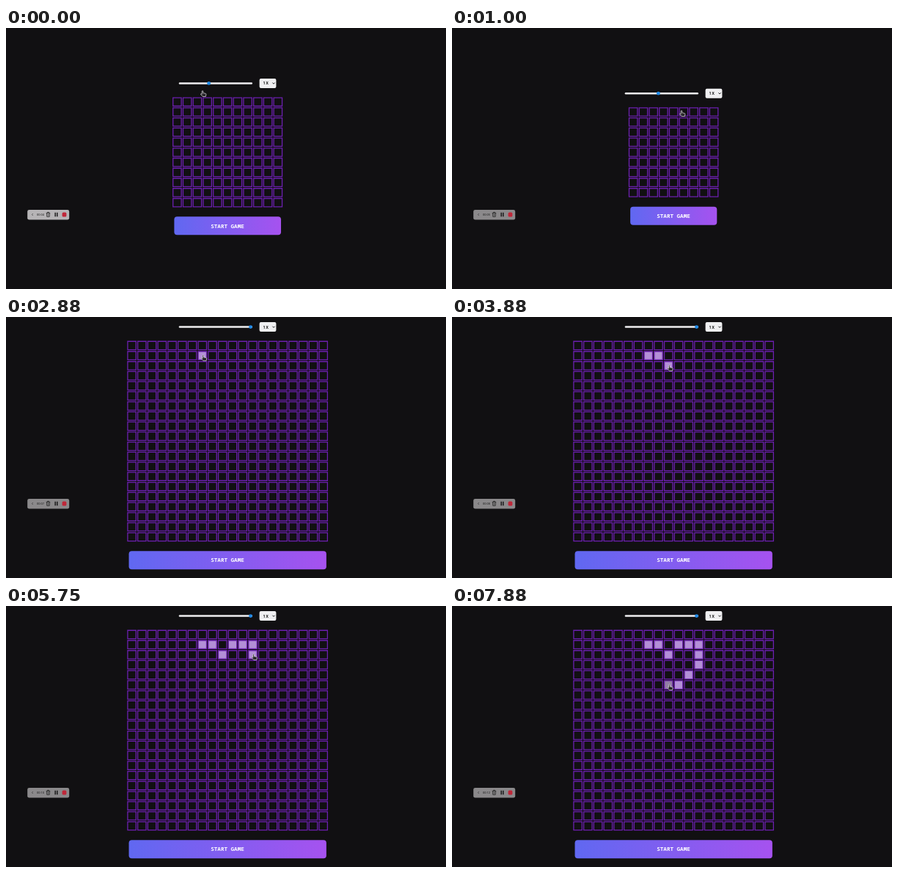
Animation, 600 px wide and 356 px high, one loop 8000 ms. Source, as an HTML page:

```html
<!DOCTYPE html>
<html lang="en">
<head>
<meta charset="utf-8">
<title>Grid game</title>
<style>
  html, body { margin: 0; width: 100%; height: 100%; overflow: hidden; background: #111012; }
  svg { display: block; width: 600px; height: 356px; }
  .label { font: 700 7.6px "Noto Sans Mono", "DejaVu Sans Mono", monospace; fill: #fff; text-anchor: middle; }
  .speed { font: 700 5.1px Inter, sans-serif; fill: #111; }
  .clock { font: 4px Roboto, sans-serif; fill: #222; text-anchor: middle; }
</style>
</head>
<body>
<svg viewBox="0 0 600 356">
  <defs>
    <linearGradient id="fade">
      <stop offset="0" stop-color="#6068f1"/>
      <stop offset="1" stop-color="#a652ef"/>
    </linearGradient>
  </defs>

  <g id="controls">
    <rect x="235.7" y="-1.25" width="100.3" height="2.5" rx="1.25" fill="#eeedf0"/>
    <circle id="thumb" r="2.4" fill="#1f8ae8"/>
    <rect x="345.6" y="-6.5" width="22.8" height="13" rx="2" fill="#efeff1"/>
    <text class="speed" x="350.8" y="1.9">1 X</text>
    <path d="M363.4 -.9l1.6 1.7 1.6 -1.7" fill="none" stroke="#111" stroke-width=".9"/>
  </g>

  <path id="filled" fill="#b38fd7"/>
  <path id="hovered" fill="#927da5"/>
  <path id="grid" fill="none" stroke="#6b1fae" stroke-width="1.3"/>

  <g id="start">
    <rect id="button" height="25" rx="4" fill="url(#fade)"/>
    <text class="label" x="302" y="15.2">START GAME</text>
  </g>

  <g>
    <rect id="bar" x="29.2" y="248" width="57" height="13.6" rx="2.4"/>
    <path d="M36.8 253l-1.4 1.5 1.4 1.5" fill="none" stroke="#333" stroke-width=".7"/>
    <text class="clock" id="clock" x="47" y="255.8"></text>
    <path d="M54.8 252.4h5.4M56.5 252.2v-.9h2v.9M55.4 252.6l.4 4.8h3.4l.4 -4.8M57.5 253.6v2.6"
          fill="none" stroke="#222" stroke-width=".8"/>
    <path d="M67.2 251.7v5.6M69.8 251.7v5.6" stroke="#111" stroke-width="1.4"/>
    <rect x="76.6" y="251.6" width="5.8" height="5.8" rx="1.5" fill="#bf2739"/>
  </g>

  <path id="hand" fill="#29272b" stroke="#d8d6da" stroke-width=".75" stroke-linejoin="round"
        d="M-.8 .6Q0 -.5 .8 .6V3.2L4 3.8Q5 4.1 4.9 5.2L4.3 8H.2L-2.5 5Q-2.6 4 -1.6 4.2L-.8 4.9Z"/>
</svg>
<script>
const LOOP = 8000, STEP = 125;
const PITCH = 13.74, CX = 302.15, CY = 169.5, MAX = 20;
const DRAG_END = 11, FIRST_CLICK = 22, CLICK_GAP = 4;

// Cells of the drawn outline in click order, one hex digit each
const columns = "789abcccba9", rows = "11211123455";
const trail = [...columns].map((c, i) => [parseInt(c, 16), parseInt(rows[i], 16)]);

const $ = id => document.getElementById(id);
const set = (id, attrs) => {
  for (const key in attrs) $(id).setAttribute(key, attrs[key]);
};
const mix = (a, b, p) => a + (b - a) * p;

const corner = (index, n, centre) => centre + (index - n / 2) * PITCH + 1.15;
const square = (c, r, n) => `M${corner(c, n, CX)} ${corner(r, n, CY)}h11.4v11.4h-11.4z`;
const tip = ([c, r]) => [corner(c, MAX, CX) + 6.7, corner(r, MAX, CY) + 4.7];

// Pointer while dragging the slider and moving to the first cell: step, x, y
const drag = [
  [-2, 289, 83], [0, 268, 85.5], [3, 258, 95], [6, 281, 106], [7, 283, 108],
  [8, 313, 112.5], [9, 336, 115], [DRAG_END, 363.5, 118], [14, 380, 118],
  [FIRST_CLICK, ...tip(trail[0])]
];

function pointer(k) {
  if (k < FIRST_CLICK) {
    const i = drag.findIndex(key => key[0] > k);
    const [t0, x0, y0] = drag[i - 1], [t1, x1, y1] = drag[i];
    const p = (k - t0) / (t1 - t0);
    return [mix(x0, x1, p), mix(y0, y1, p)];
  }
  // Rest on a cell for one step, then glide to the next
  const beat = (k - FIRST_CLICK) / CLICK_GAP, i = Math.floor(beat);
  const from = tip(trail[i]), to = tip(trail[i + 1] || trail[i]);
  const p = Math.max(0, (beat - i - .25) / .75);
  return from.map((v, axis) => mix(v, to[axis], p));
}

// Slider value under the pointer; thumb and grid read it with a delay
function value(k) {
  const [x] = pointer(Math.min(k, DRAG_END));
  return Math.max(1, Math.min(MAX, Math.round((x - 238.7) / 94.8 * MAX)));
}

function layout(n) {
  const half = n * PITCH / 2;
  let d = "";
  for (let i = 0; i < n * n; i++) d += square(i % n, Math.floor(i / n), n);
  set("grid", { d });
  set("controls", { transform: `translate(0 ${CY - half - 18.5})` });
  set("start", { transform: `translate(0 ${CY + half + 12.3})` });
  set("button", { x: CX - half + 2.8, width: half * 2 - 5.5 });
}

function draw(k) {
  layout(value(k - 2));
  set("thumb", { cx: 238.7 + value(k - 1) / MAX * 94.8 });

  // The last cell is only hovered
  const reached = Math.max(0, Math.floor((k - FIRST_CLICK) / CLICK_GAP) + 1);
  const squares = trail.slice(0, reached).map(([c, r]) => square(c, r, MAX));
  const hovered = reached === trail.length ? squares.pop() : "";
  set("filled", { d: squares.join("") });
  set("hovered", { d: hovered });

  const shade = Math.round(mix(182, 139, Math.min(1, k / 4)));
  set("bar", { fill: `rgb(${shade},${shade - 2},${shade})` });
  const seconds = Math.floor(4.3 + k * STEP / 1000);
  $("clock").textContent = "00:" + String(seconds).padStart(2, "0");
  set("hand", { transform: `translate(${pointer(k)})` });
}

let last = -1;
function tick() {
  const k = Math.floor(performance.now() % LOOP / STEP);
  if (k !== last) draw(last = k);
  requestAnimationFrame(tick);
}
tick();
</script>
</body>
</html>
```
